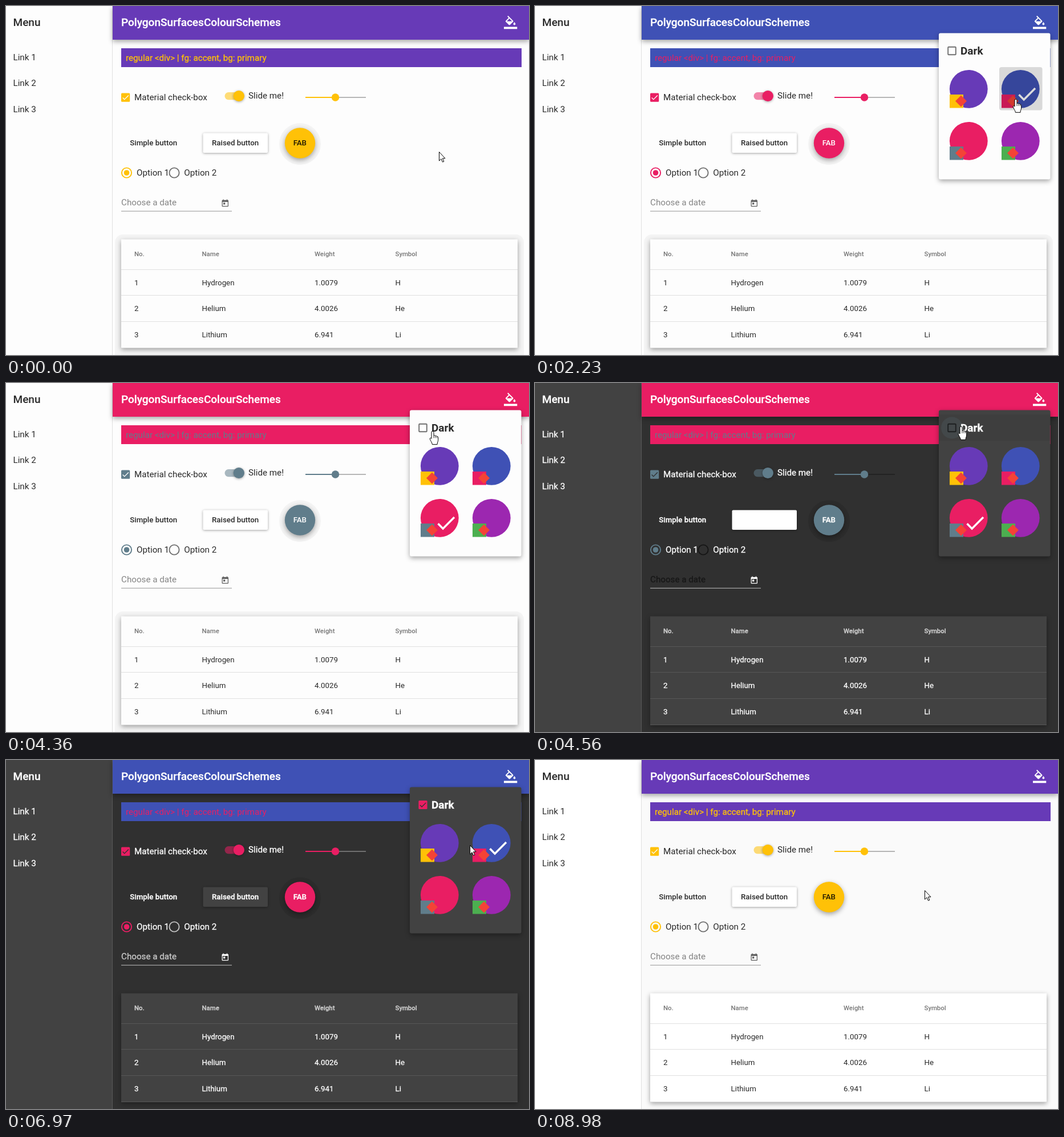
Write an HTML page that moves like this. It is 917 by 611 pixels and loops after 9060 ms.

```html
<!DOCTYPE html>
<html lang="en">
<head>
<meta charset="utf-8">
<title>Theme picker</title>
<style>
html, body { margin: 0; height: 100%; overflow: hidden; background: #fdfdfd; }
svg { display: block; width: 100vw; height: 100vh; font: 15.2px Roboto, sans-serif; color: var(--text); }
text { fill: currentColor; stroke: currentColor; stroke-width: var(--weight); white-space: pre; }
.big { font-size: 19px; font-weight: 500; }
.btn { font-size: 13.3px; font-weight: 500; }
.cell { font-size: 13.3px; }
.head { font-size: 11.4px; font-weight: 500; color: var(--sub); }
.primary { fill: var(--primary); }
.accent { fill: var(--accent); }
.card { fill: var(--card); }
.ring { fill: none; stroke-width: 1.9; }
.tick { fill: none; stroke: var(--main); stroke-width: 2.1; }
.line { stroke: var(--line); }
.low { filter: drop-shadow(0 1px 2px rgba(0,0,0,.36)); }
.high { filter: drop-shadow(0 3px 4px rgba(0,0,0,.36)); }
</style>
</head>
<body>
<svg id="stage" viewBox="0 0 917 611" preserveAspectRatio="none"></svg>
<script>
const LOOP = 9060;
const stage = document.getElementById('stage');
const el = id => document.getElementById(id);

const PRIMARY = ['#673ab7', '#3f51b5', '#e91e63', '#9c27b0'];
const ACCENT = [[255, 193, 7], [233, 30, 99], [96, 125, 139], [76, 175, 80]];
const ON_ACCENT = ['rgba(0,0,0,.87)', '#fff', '#fff', 'rgba(0,0,0,.87)'];
// time of click, chosen theme
const PICKS = [[-999, 0], [2090, 1], [2880, 3], [3395, 2], [5875, 3], [6600, 1], [7460, 0]];
// time, pointer tip
const PATH = [
  [70, 759, 255], [920, 885, 34], [1100, 885, 34], [1780, 843, 163], [2700, 843, 163],
  [2850, 850, 228], [2960, 850, 228], [3320, 766, 229], [3640, 766, 229], [4480, 747, 76],
  [5180, 747, 76], [5650, 828, 212], [6050, 828, 212], [6480, 862, 150], [6740, 862, 150],
  [7190, 768, 148], [7560, 768, 148], [8110, 726, 91], [8200, 728, 80], [8290, 728, 80], [8700, 683, 228]
];
const DARK_ON = 4555, DARK_OFF = 8195;

const rgba = c => `rgba(${c.join()})`;
const ramp = (t, a, b) => Math.min(1, Math.max(0, (t - a) / (b - a)));
const smooth = k => k * k * (3 - 2 * k);
const mix = (a, b, k) => rgba(a.map((v, i) => v + (b[i] - v) * k));
const show = (id, on) => el(id).setAttribute('visibility', on ? 'inherit' : 'hidden');

// ---- picture ----
const text = (x, y, s, cls = '', more = '') => `<text x="${x}" y="${y}" class="${cls}" ${more}>${s}</text>`;
const rect = (x, y, w, h, more = '') => `<rect x="${x}" y="${y}" width="${w}" height="${h}" ${more}/>`;
const circle = (x, y, r, more = '') => `<circle cx="${x}" cy="${y}" r="${r}" ${more}/>`;
const path = (d, more = '') => `<path d="${d}" ${more}/>`;
const checked = (x, y) => rect(x, y, 15.2, 15.2, 'class="accent" rx="1.5"') +
  path('M4.1 12.7 9 17.6 20.3 6.3', `class="tick" transform="translate(${x} ${y}) scale(.633)"`);

const swatchAt = i => [723 + i % 2 * 91, 107 + (i >> 1) * 91];
const swatch = i => {
  const [x, y] = swatchAt(i);
  return `<g transform="translate(${x} ${y})">` +
    circle(37.3, 38.3, 33.4, `fill="${PRIMARY[i]}"`) +
    rect(4, 48, 24, 23.5, `fill="${rgba(ACCENT[i])}"`) +
    path('M24 49.5l10 10-10 10-10-10z', 'fill="#f44336"') +
    path('M9 16.17 4.83 12l-1.42 1.41L9 19 21 7l-1.41-1.41z',
      `id="pick${i}" fill="#fff" transform="translate(27.3 26) scale(1.76)"`) +
    rect(0, 0, 75.6, 75.6, `id="over${i}" rx="4" fill="var(--ink)" opacity=".045"`) + '</g>';
};

const COLS = [225, 343.5, 541, 682.5];
const ROWS = [['1', 'Hydrogen', '1.0079', 'H'], ['2', 'Helium', '4.0026', 'He'], ['3', 'Lithium', '6.941', 'Li']];
const table = rect(202, 408.5, 695, 190, 'class="card high"') +
  ['No.', 'Name', 'Weight', 'Symbol'].map((s, i) => text(COLS[i], 438, s, 'head')).join('') +
  ROWS.map((row, r) => row.map((s, i) => text(COLS[i], 488.7 + r * 45.6, s, 'cell')).join('') +
    path(`M202 ${[461.5, 506.5, 552.5][r]}H897`, 'class="line"')).join('') +
  path('M202 598.5H897', 'class="line"');

const sidebar = rect(0, 0, 186, 611, 'class="card"') + path('M186.5 0V611', 'class="line"') +
  text(12.5, 35, 'Menu', 'big') +
  [1, 2, 3].map(n => text(12.5, 49.2 + n * 45.6, 'Link ' + n)).join('');

const toolbar = rect(187, 0, 730, 59, 'class="primary high"') +
  text(202, 35, 'PolygonSurfacesColourSchemes', 'big', 'style="color:#fff;stroke-width:.3"') +
  path('M16.56 8.94L7.62 0 6.21 1.41l2.38 2.38-5.15 5.15c-.59.59-.59 1.54 0 2.12l5.5 5.5c.29.29.68.44 1.06.44s.77-.15 1.06-.44l5.5-5.5c.59-.58.59-1.53 0-2.12zM5.21 10L10 5.21 14.79 10H5.21zM19 11.5s-2 2.17-2 3.5c0 1.1.9 2 2 2s2-.9 2-2c0-1.33-2-3.5-2-3.5zM0 20h24v4H0z',
    'fill="#fff" transform="translate(873 17) scale(.97)"') +
  circle(885, 29, 19, 'id="iconRipple" fill="#fff"');

const controls = rect(202, 74, 702, 33, 'class="primary"') +
  text(210, 96, 'regular &lt;div&gt; | fg: accent, bg: primary', '', 'style="color:var(--label);stroke-width:var(--labelWeight)"') +
  checked(202, 152.5) + text(225, 165, 'Material check-box') +
  rect(383.5, 151, 34, 13.3, 'class="accent" rx="6.6" opacity=".54"') +
  circle(408.3, 157.5, 9.6, 'class="accent low"') + text(425, 162, 'Slide me!') +
  rect(525, 159, 106, 2, 'fill="var(--track)"') + rect(525, 159, 52, 2, 'class="accent"') +
  circle(577.5, 160, 6.7, 'class="accent"') +
  text(217.3, 244, 'Simple button', 'btn') +
  rect(345.5, 222.5, 113.5, 34.5, 'class="low" rx="2" fill="var(--raised)"') +
  text(361, 244, 'Raised button', 'btn') +
  circle(515.5, 240, 26.7, 'class="accent high"') +
  text(515.3, 244, 'FAB', 'btn', 'text-anchor="middle" style="color:var(--fab)"') +
  circle(211.5, 292, 8.6, 'class="ring" stroke="var(--accent)"') + circle(211.5, 292, 4.8, 'class="accent"') +
  text(229, 297, 'Option 1') +
  circle(295, 292, 8.6, 'class="ring" stroke="var(--faint)"') + text(312.3, 297, 'Option 2') +
  text(202, 349, 'Choose a date', '', 'style="color:var(--hint)"') +
  path('M202 359.2H396', 'stroke="var(--rule)"') +
  path('M19 3h-1V1h-2v2H8V1H6v2H5c-1.1 0-2 .9-2 2v14c0 1.1.9 2 2 2h14c1.1 0 2-.9 2-2V5c0-1.1-.9-2-2-2zm0 16H5V8h14zM7 10h5v5H7z',
    'fill="var(--icon)" transform="translate(376.6 337.8) scale(.64)"');

const panel = `<g id="panel">` + rect(708, 47.5, 195.5, 256, 'class="card high" rx="3"') +
  rect(708, 55, 195.5, 46, 'id="row" fill="var(--hover)"') +
  circle(731, 78.5, 19, 'id="halo" class="accent" opacity=".16"') +
  rect(724.2, 71.7, 13.6, 13.6, 'id="empty" class="ring" rx="1" stroke="var(--faint)"') +
  `<g id="full">${checked(723.4, 70.9)}</g>` +
  text(746, 85, 'Dark', 'big', 'style="font-weight:700"') +
  [0, 1, 2, 3].map(swatch).join('') +
  '<clipPath id="clip">' + rect(0, 0, 75.6, 75.6, 'id="clipBox" rx="4"') + '</clipPath>' +
  '<g clip-path="url(#clip)">' + circle(0, 0, 1, 'id="ripple" fill="var(--ink)"') + '</g></g>';

const pointer = '<g id="pointer" fill="#fff" stroke="#000" stroke-linejoin="round">' +
  path('M.5.5V16L4 12.7 6.5 18.2 8.8 17.2 6.4 11.8H11Z', 'id="arrow"') +
  '<g id="hand">' +
  path('M-2 13V2a2 2 0 0 1 4 0V8c.8-1 2.6-.8 2.9.5.9-.8 2.4-.4 2.7.8.9-.4 2.1.2 2.1 1.6V15c0 3.2-1.5 4.2-1.7 8.3H-.6C-.9 19.6-4 17-4.8 13.4-5 11.4-3 11.4-2 13Z') +
  path('M2 8v4M4.9 8.6V12M7.6 9.4V12', 'stroke-width=".8"') + '</g></g>';

stage.innerHTML = rect(187, 0, 730, 611, 'fill="var(--main)"') +
  `<g fill="var(--glow)"><g id="glows">` + circle(515.5, 241.5, 36.5) + '</g>' +
  rect(191, 400, 717, 225, 'id="tableGlow" rx="14"') + '</g>' +
  sidebar + controls + table + toolbar + panel + pointer;

// ---- motion ----
function tipAt(t) {
  const i = PATH.findIndex(p => p[0] > t);
  if (i === 0) return PATH[0].slice(1);
  if (i < 0) return PATH[PATH.length - 1].slice(1);
  const [t0, x0, y0] = PATH[i - 1], [t1, x1, y1] = PATH[i], k = smooth(ramp(t, t0, t1));
  return [x0 + (x1 - x0) * k, y0 + (y1 - y0) * k];
}

function setColours(t, dark, late) {
  const n = PICKS.filter(p => p[0] <= t).length - 1;
  const [clicked, theme] = PICKS[n], before = PICKS[Math.max(0, n - 1)][1];
  const clean = t >= DARK_OFF;
  const vars = {
    primary: PRIMARY[theme],
    accent: mix(ACCENT[before], ACCENT[theme], ramp(t, clicked + 20, clicked + 140)),
    label: rgba(ACCENT[theme]),
    labelWeight: theme ? 0 : .3,
    fab: ON_ACCENT[theme],
    text: dark ? '#fff' : 'rgba(0,0,0,.84)',
    weight: dark ? .3 : 0,
    sub: dark ? 'rgba(255,255,255,.7)' : 'rgba(0,0,0,.54)',
    main: dark ? '#303030' : clean ? '#fafafa' : '#fdfdfd',
    card: dark ? '#424242' : clean ? '#fff' : '#fdfdfd',
    line: dark ? '#575757' : '#e0e0e0',
    glow: dark ? '#2c2c2c' : '#f4f4f4',
    rule: dark ? 'rgba(255,255,255,.7)' : 'rgba(0,0,0,.42)',
    icon: dark ? '#fff' : 'rgba(0,0,0,.62)',
    ink: dark ? '#fff' : '#000',
    track: mix([0, 0, 0, .28], [255, 255, 255, .3], late),
    raised: mix([255, 255, 255, 1], [66, 66, 66, 1], late),
    faint: mix([0, 0, 0, .56], [255, 255, 255, .7], late),
    hint: mix([0, 0, 0, .48], [255, 255, 255, .7], late),
    hover: mix([0, 0, 0, .06], [255, 255, 255, .05], late)
  };
  for (const name in vars) stage.style.setProperty('--' + name, vars[name]);
  show('glows', !clean);
  show('tableGlow', !clean && !dark);
  for (let i = 0; i < 4; i++) show('pick' + i, i === theme);
}

function setPanel(t) {
  const open = ramp(t, 1100, 1200), grow = 1 - (1 - ramp(t, 1200, 1480)) ** 3;
  el('panel').setAttribute('transform',
    `translate(903.5 47.5) scale(${open} ${open * (.5 + grow / 2)}) translate(-903.5 -47.5)`);
  el('panel').setAttribute('opacity', open * (1 - ramp(t, 8740, 8880)));
  el('iconRipple').setAttribute('opacity', t < 1000 ? 0 : .2 * (1 - ramp(t, 1100, 1450)));
}

function setRipple(t) {
  const pick = PICKS.find(p => t >= p[0] - 60 && t < p[0] + 350);
  show('ripple', pick);
  if (!pick) return;
  const [x, y] = tipAt(pick[0]), [bx, by] = swatchAt(pick[1]), age = t - pick[0];
  const attrs = { cx: x, cy: y, r: Math.min(110, (age + 60) * .7), opacity: .1 * (1 - ramp(age, 200, 350)) };
  for (const a in attrs) el('ripple').setAttribute(a, attrs[a]);
  el('clipBox').setAttribute('x', bx);
  el('clipBox').setAttribute('y', by);
}

function setPointer(t) {
  const [x, y] = tipAt(t), open = t > 1300 && t < 8740;
  const inside = (a, b, w, h) => x >= a && x < a + w && y >= b && y < b + h;
  const inRow = open && inside(708, 55, 195, 46);
  let hand = inRow || t < 1300 && inside(866, 10, 38, 38);
  for (let i = 0; i < 4; i++) {
    const over = open && inside(...swatchAt(i), 76, 76);
    show('over' + i, over);
    hand = hand || over;
  }
  show('row', inRow && (t > 4540 && t < 4780 || t > 7900));
  show('halo', inRow && (t > 4430 && t < 4780 || t > 7900));
  show('hand', hand);
  show('arrow', !hand);
  el('pointer').setAttribute('transform', `translate(${x} ${y})`);
}

function draw(now) {
  const t = now % LOOP;
  const dark = t >= DARK_ON && t < DARK_OFF;
  const late = ramp(t, 4570, 4790) - ramp(t, 8220, 8420);
  setColours(t, dark, late);
  show('full', late > .3);
  show('empty', late <= .3);
  setPanel(t);
  setRipple(t);
  setPointer(t);
}

const start = performance.now();
function tick() {
  draw(performance.now() - start);
  requestAnimationFrame(tick);
}
tick();
</script>
</body>
</html>
```
